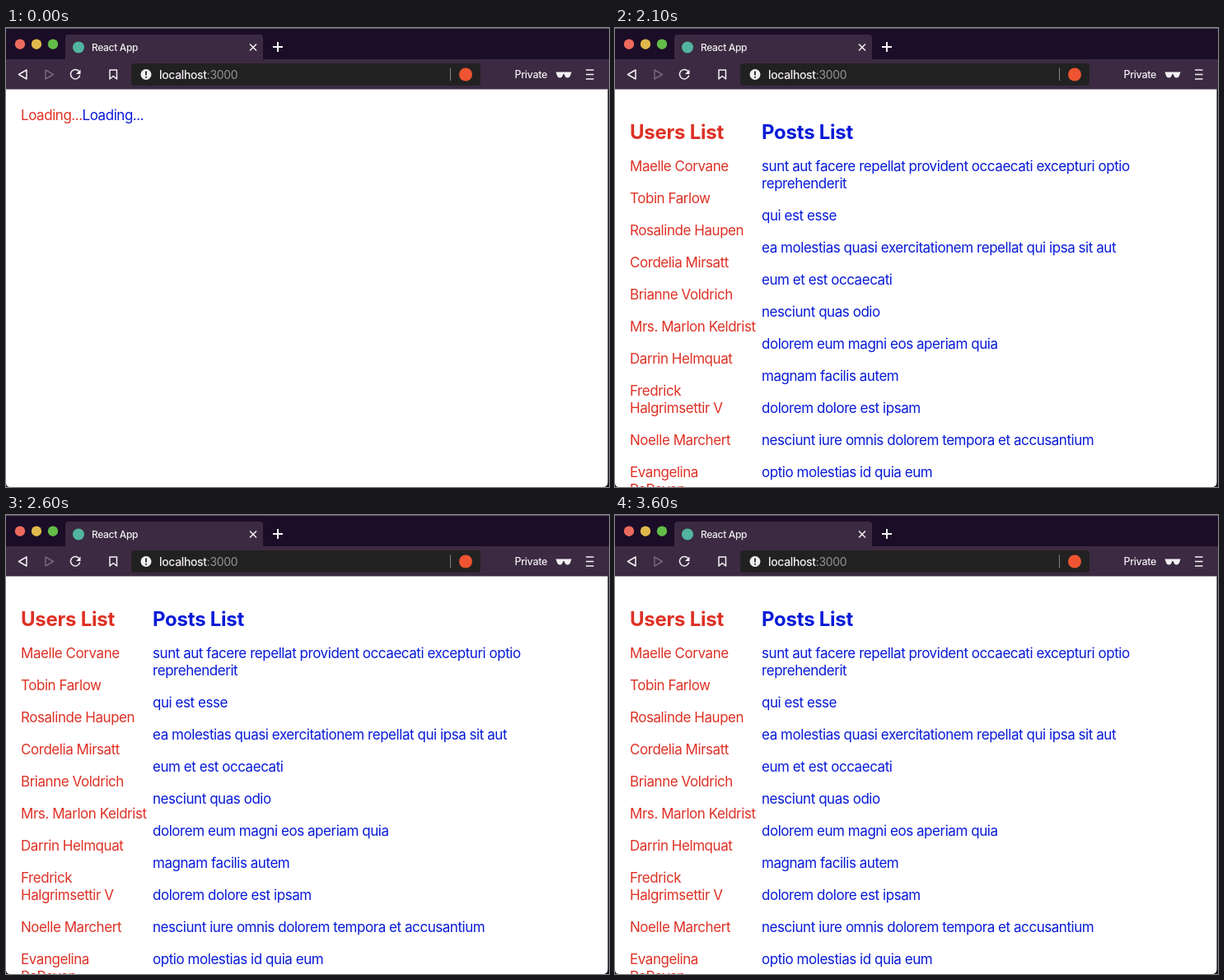
An HTML page for the animation above (3700 ms loop, 732x558 px).

```html
<!DOCTYPE html>
<html lang="en">
<head>
<meta charset="utf-8">
<title>React App</title>
<style>
  html, body { margin: 0; width: 100%; height: 100%; overflow: hidden; background: #19101f; }
  svg { display: block; width: 732px; height: 558px; font-family: Inter, Roboto, sans-serif; }
  .icon { fill: none; stroke: #f4f1f5; stroke-width: 1.5; stroke-linejoin: round; }
  .ui { fill: #f1edf2; font-size: 12px; font-weight: 500; letter-spacing: -.33px; }
  .url { font-size: 14px; letter-spacing: -.35px; }
  .page { font-size: 17px; letter-spacing: -.45px; }
  .page .head { font-size: 24px; font-weight: 700; letter-spacing: -.25px; }
  .red { fill: #de3125; }
  .blue { fill: #081bd8; }
</style>
</head>
<body>
<svg viewBox="0 0 732 558">
  <!-- Window -->
  <path fill="#1b0d27" d="M0 0H732V38H0z"/>
  <path fill="#65586c" d="M0 0H732V1H0z"/>
  <path fill="#3b2a41" d="M0 38H732V75H0z M72 38V12q0-4 4-4H308q4 0 4 4V38z"/>
  <path fill="#fff" d="M0 74.500H730.5V552q0 6-6 6H5q-5 0-5-5z"/>
  <circle cx="17" cy="19.700" r="6.200" fill="#ed6a5e"/>
  <circle cx="37" cy="19.700" r="6.200" fill="#e0b94c"/>
  <circle cx="57" cy="19.700" r="6.200" fill="#62bd47"/>

  <!-- Tab -->
  <circle cx="88" cy="23.500" r="7" fill="#52b5a0"/>
  <text class="ui" x="104" y="27.500">React App</text>
  <path class="icon" d="M296 19.500l8 8m0-8l-8 8"/>
  <path class="icon" style="stroke-width:2" d="M324 23h12m-6-6v12"/>

  <!-- Toolbar -->
  <path class="icon" d="M25 51V62L15.500 56.500z"/>
  <path class="icon" style="stroke:#75677b" d="M48 51V62L57.500 56.500z"/>
  <path class="icon" d="M88.500 52.500A5.700 5.700 0 1 0 89.700 57.500"/>
  <path fill="#f4f1f5" d="M90.500 50.500V56H85z"/>
  <path class="icon" d="M126 51H134.500V62L130.250 58.500L126 62z"/>
  <rect x="152" y="43" width="424" height="27" rx="4" fill="#222122"/>
  <circle cx="170" cy="56.500" r="6.500" fill="#f1f0f1"/>
  <path stroke="#222122" stroke-width="1.800" d="M170 52.500V57.500M170 59V60.800"/>
  <text class="ui url" x="186" y="61.500">localhost<tspan fill="#969496" font-weight="400">:3000</tspan></text>
  <path stroke="#858286" d="M539.500 48.500V64"/>
  <circle cx="558" cy="56.500" r="8" fill="#ee5431"/>
  <text class="ui" x="617.500" y="61" style="font-size:12.500px">Private</text>
  <path fill="#f4f1f5" d="M667.500 53.500H686.500L685 58Q684 60.500 681.500 60.500Q679 60.500 678 57L677 55.500L676 57Q675 60.500 672.500 60.500Q670 60.500 669 58z"/>
  <path class="icon" d="M704 51h9.500m-9.500 5.500h9.500m-9.500 5.500h9.500"/>

  <!-- Page -->
  <g class="page" id="loading"></g>
  <g class="page" id="lists"></g>
</svg>
<script>
const loading = document.getElementById("loading");
const lists = document.getElementById("lists");

function addText(parent, text, x, y, style) {
  const node = document.createElementNS("http://www.w3.org/2000/svg", "text");
  node.setAttribute("x", x);
  node.setAttribute("y", y);
  node.setAttribute("class", style);
  node.textContent = text;
  parent.append(node);
}

// Items sit 39px apart; each wrapped line adds 21px.
function addList(title, items, x, color) {
  addText(lists, title, x, 134.5, "head " + color);
  let y = 174;
  for (const item of items) {
    for (const line of item.split("\n")) {
      addText(lists, line, x, y, color);
      y += 21;
    }
    y += 18;
  }
}

addText(loading, "Loading...", 18, 112, "red");
addText(loading, "Loading...", 92.5, 112, "blue");

addList("Users List", [
  "Maelle Corvane",
  "Tobin Farlow",
  "Rosalinde Haupen",
  "Cordelia Mirsatt",
  "Brianne Voldrich",
  "Mrs. Marlon Keldrist",
  "Darrin Helmquat",
  "Fredrick\nHalgrimsettir V",
  "Noelle Marchert",
  "Evangelina\nPaRoven"
], 18, "red");

addList("Posts List", [
  "sunt aut facere repellat provident occaecati excepturi optio\nreprehenderit",
  "qui est esse",
  "ea molestias quasi exercitationem repellat qui ipsa sit aut",
  "eum et est occaecati",
  "nesciunt quas odio",
  "dolorem eum magni eos aperiam quia",
  "magnam facilis autem",
  "dolorem dolore est ipsam",
  "nesciunt iure omnis dolorem tempora et accusantium",
  "optio molestias id quia eum"
], 178, "blue");

const LOOP = 3700, LOADED = 2100;
const start = performance.now();

function draw() {
  const loaded = (performance.now() - start) % LOOP >= LOADED;
  loading.style.display = loaded ? "none" : "";
  lists.style.display = loaded ? "" : "none";
  requestAnimationFrame(draw);
}
draw();
</script>
</body>
</html>
```
